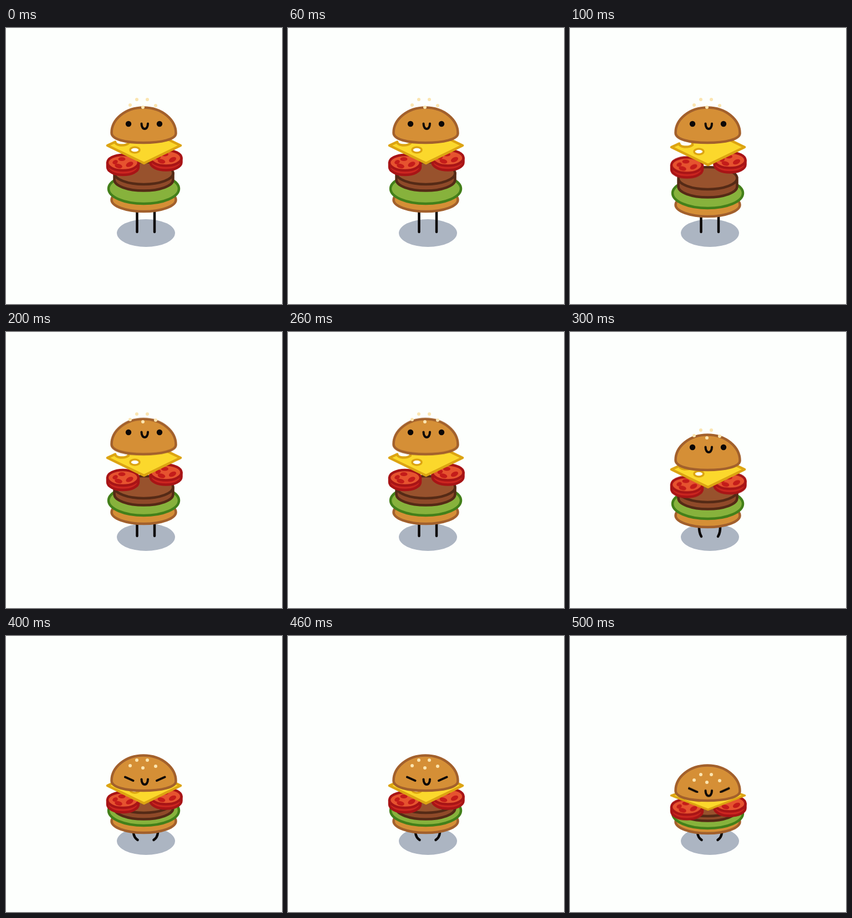
Animation of 498x498 px, one loop 0.6 s. Source, as an HTML page:

```html
<!DOCTYPE html>
<html lang="en">
<head>
<meta charset="utf-8">
<title>Bouncing burger</title>
<style>
  html, body { margin: 0; width: 100%; height: 100%; overflow: hidden; background: #fdfffd; }
  svg { display: block; width: 100%; height: 100%; }

  /* Each part drops through six held poses, given as --a to --f. */
  .part { animation: drop .6s step-end infinite; }
  @keyframes drop {
    0%      { transform: translateY(var(--a)); }
    16.667% { transform: translateY(var(--b)); }
    33.333% { transform: translateY(var(--c)); }
    50%     { transform: translateY(var(--d)); }
    66.667% { transform: translateY(var(--e)); }
    83.333%, 100% { transform: translateY(var(--f)); }
  }
  .part      { --a: 0px; }
  .heel      { --b: 9px;    --c: 15px;   --d: 21px;   --e: 24px; --f: 25px; }
  .lettuce   { --b: 8px;    --c: 14px;   --d: 20px;   --e: 25px; --f: 30px; }
  .patty     { --a: -12px;  --b: 0px; --c: 7px; --d: 14px; --e: 25px; --f: 28px; }
  .patty-top { --a: -9px;   --b: 0px; --c: 9px; --d: 16px; --e: 28px; --f: 34px; }
  .tomato-l  { --b: 4.5px;  --c: 20px;   --d: 32.5px; --e: 53px; --f: 65.5px; }
  .tomato-r  { --b: 4px;    --c: 19px;   --d: 34.5px; --e: 55px; --f: 68px; }
  .cheese    { --b: 3px;    --c: 15px;   --d: 36px;   --e: 58px; --f: 76px; }
  .crown     { --b: 0px;    --c: 13.5px; --d: 42px;   --e: 72px; --f: 90px; }
  .face      { --b: 0px;    --c: 8px;    --d: 35px;   --e: 86px; --f: 106.5px; }
  .seeds     { --b: 0px;    --c: 19px;   --d: 48px;   --e: 95px; --f: 121px; }

  .squash { transform-origin: 249px 211px; animation: squash .6s step-end infinite; }
  @keyframes squash { 0% { transform: none; } 83.333%, 100% { transform: scaleY(.8); } }

  .early, .mid, .late { animation: early .6s step-end infinite; }
  .mid  { animation-name: mid; }
  .late { animation-name: late; }
  .open { animation: open .6s step-end infinite; }
  @keyframes early { 0% { opacity: 1; } 50%, 100% { opacity: 0; } }
  @keyframes mid   { 0% { opacity: 0; } 50% { opacity: 1; } 66.667%, 100% { opacity: 0; } }
  @keyframes late  { 0% { opacity: 0; } 66.667%, 100% { opacity: 1; } }
  @keyframes open  { 0% { opacity: 1; } 66.667%, 100% { opacity: 0; } }

  .bun { fill: #d58f36; stroke: #a2602c; }
  .ink { fill: none; stroke: #0c0807; }
</style>
</head>
<body>
<svg viewBox="0 0 498 498" stroke-width="4.5" stroke-linecap="round" stroke-linejoin="round">
  <defs>
    <g id="slice">
      <path d="M-28 0V8A28 14 0 0 0 28 8V0Z" fill="#cb2620" stroke="#a81416"/>
      <ellipse rx="28" ry="14" fill="#e6532f" stroke="#a81416"/>
      <g fill="#c41c1a">
        <ellipse cx="-2" cy="-6.5" rx="6.5" ry="3.6"/>
        <ellipse cx="-14" cy="-1" rx="5" ry="3.6" transform="rotate(-25 -14 -1)"/>
        <ellipse cx="-8" cy="6" rx="7" ry="4" transform="rotate(15 -8 6)"/>
        <ellipse cx="12" cy="3" rx="7" ry="4.2" transform="rotate(-25 12 3)"/>
      </g>
    </g>
  </defs>

  <ellipse cx="252.5" cy="370" rx="52.5" ry="25" fill="#acb5c2"/>

  <g class="ink">
    <path class="early" d="M236.5 325V368M268 325V368"/>
    <path class="mid" d="M233 350Q232.5 362 237 369M271 350Q271.5 362 267 369"/>
    <path class="late" d="M230 355Q231 364 237.5 368M274 355Q273 364 266.5 368"/>
  </g>

  <ellipse class="part heel bun" cx="248.5" cy="310" rx="58" ry="21"/>
  <ellipse class="part lettuce" cx="248.5" cy="290" rx="63.5" ry="27" fill="#87b23c" stroke="#43801a"/>

  <path class="part patty" d="M195.5 274V286A53 19.500 0 0 0 301.5 286V274" fill="#8f4a29" stroke="#552a16"/>
  <ellipse class="part patty-top" cx="248.5" cy="271" rx="53" ry="20" fill="#98522d" stroke="#552a16"/>

  <g class="part tomato-l"><use href="#slice" x="211" y="243"/></g>
  <g class="part tomato-r"><use href="#slice" x="288.5" y="234.5"/></g>

  <g class="part cheese">
    <g class="squash" stroke="#dca412">
      <path d="M183 212L197 205.500C198 212 213 214 221 208V193L249 180L315 212L249 244Z" fill="#fbd82c"/>
      <ellipse cx="232.5" cy="220" rx="8.500" ry="5" fill="#fdfffd" stroke-width="3.5"/>
    </g>
  </g>

  <path class="part crown bun" d="M190.5 189C190.5 165 215 143.500 248 143.500C282 143.500 306.5 166 306.5 190C306.5 201 280 207 248 207C215 207 190.5 201 190.5 189Z"/>

  <g class="part face ink">
    <path d="M244.5 172.5C244.5 185 256 185 256 172.5" stroke-width="4"/>
    <g class="open" fill="#0c0807" stroke="none">
      <circle cx="221" cy="173" r="5.2"/>
      <circle cx="277" cy="173" r="5.2"/>
    </g>
    <path class="late" d="M215 168.5L229.5 175M286.5 168.5L272 175" stroke-width="4"/>
  </g>

  <g class="part seeds" fill="#fbe5b0">
    <circle cx="236" cy="129" r="3"/>
    <circle cx="255" cy="129" r="3"/>
    <circle cx="224" cy="139" r="3"/>
    <circle cx="270" cy="140" r="3"/>
    <circle cx="247" cy="143" r="3"/>
  </g>
</svg>
</body>
</html>
```
